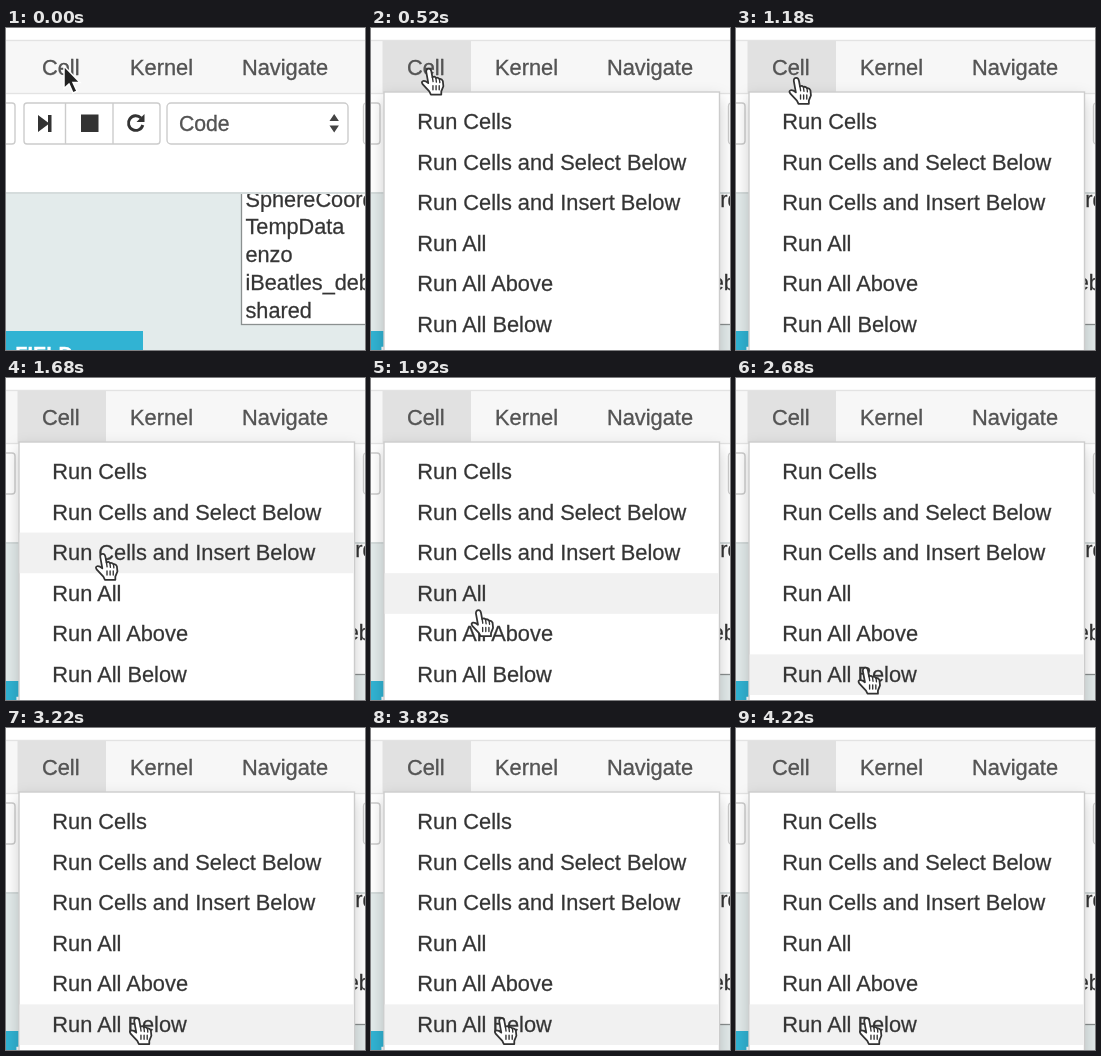
These frames come from a looping animation (359x322 px, 4.24 s). An HTML page:

```html
<!DOCTYPE html>
<html lang="en">
<head>
<meta charset="utf-8">
<title>Cell menu</title>
<style>
  html, body { margin: 0; width: 100%; height: 100%; overflow: hidden; background: #fff; }
  svg { display: block; width: 359px; height: 322px; font: 21.8px "Liberation Sans", Arial, sans-serif; fill: #333; }
  text, .icon, #arrow, #hand { filter: blur(.5px); }
  text { stroke: currentColor; stroke-width: .3; color: #444; }
  .panel { fill: #fff; stroke: #ccc; stroke-width: 1.4; }
  .nav { fill: #555; }
  .list { font-size: 21.7px; }
  #menu .panel { filter: drop-shadow(0 7px 8px rgba(0, 0, 0, .2)); }
</style>
</head>
<body>
<svg viewBox="0 0 359 322">
  <rect width="359" height="322" fill="#e3ebeb"/>

  <!-- page behind the header -->
  <rect x="235.5" y="100" width="140" height="196.5" fill="#fff" stroke="#8b9090" stroke-width="1.3"/>
  <g class="list" id="files"></g>
  <rect x="-5" y="303" width="142" height="30" fill="#31b3d3"/>
  <text x="67" y="333" text-anchor="end" font-size="20" font-weight="bold" style="fill:#fff;color:#fff">FIELD</text>

  <!-- header -->
  <rect y="163" width="359" height="3" fill="#d5dcdc"/>
  <rect width="359" height="164" fill="#fff"/>
  <rect x="-2" y="12.5" width="363" height="53" fill="#f7f7f7" stroke="#e3e3e3" stroke-width="1.4"/>
  <rect id="tab" x="11.5" y="13" width="88.500" height="52" fill="#e1e1e1"/>
  <g class="nav">
    <text x="36" y="47">Cell</text>
    <text x="124" y="47">Kernel</text>
    <text x="236" y="47">Navigate</text>
  </g>

  <!-- toolbar -->
  <g class="panel">
    <rect x="-20" y="75" width="29" height="41" rx="3"/>
    <rect x="18" y="75" width="136" height="41" rx="3"/>
    <path d="M59.5 75v41M107 75v41"/>
    <rect x="161" y="75" width="181" height="41" rx="4"/>
    <rect x="357.5" y="75" width="40" height="41" rx="3"/>
  </g>
  <g class="icon">
    <path d="M32 87l10 7.5v-7.5h3.500v17h-3.500v-7.500l-10 7.500z"/>
    <rect x="75" y="86.5" width="17.5" height="17.5"/>
    <path d="M135 90a7.300 7.300 0 1 0 1.800 7" fill="none" stroke="#333" stroke-width="2.9"/>
    <path d="M138.500 86v8h-8z"/>
    <path d="M323.500 93l4.700-7 4.700 7zM323.500 97.500h9.400l-4.700 7z" fill="#444"/>
  </g>
  <text x="173" y="103" font-size="21.2" style="fill:#555">Code</text>

  <g id="menu">
    <rect class="panel" x="13" y="64" width="335.5" height="290"/>
    <rect id="hover" x="13.7" width="334" height="40.6" fill="#f1f1f1"/>
    <g id="items"></g>
  </g>

  <path id="arrow" d="M58 38v22.500l5-4.500 4 9 4-1.800-4-8.700h7z" fill="#222" stroke="#fff" stroke-width="1.5"/>
  <g id="hand" stroke="#333" stroke-width="1.7" stroke-linejoin="round" stroke-linecap="round">
    <path fill="#fff" d="M7 15L5 4Q5 1 7.5 1Q9.5 1 10 4L11 9.5Q13 8 14.3 10Q16 9 17.7 11Q20 10.5 21 13L21.5 18L19.5 23V26H9.5L8 23L1.5 16Q0 13.5 2 13Q4 12.5 7 15Z"/>
    <path fill="none" d="M11 9.5l.6 4M14.3 10l.5 4M17.7 11l.4 3.5M11.5 17.5v4M14.5 17.5v4M17.5 17.5v4" stroke-width="1.3"/>
  </g>
</svg>
<script>
const LOOP = 4240, OPEN = 200, ROW = 40.6, TOP = 73.4;
const $ = id => document.getElementById(id);

// time, x, y of the hand's upper left corner
const path = [
  [0, 50, 39.5], [600, 50, 39.5], [1050, 51, 43], [1180, 52.5, 48.5], [1400, 68, 98],
  [1680, 89, 174.5], [1950, 101, 238], [2180, 109, 280.5], [2450, 119, 288], [2800, 123, 289], [LOOP, 123, 289]
];

function addLines(id, lines, x, y, step) {
  $(id).innerHTML = lines.map((s, i) => `<text x="${x}" y="${y + i * step}">${s}</text>`).join("");
}
addLines("files", ["SphereCoord", "TempData", "enzo", "iBeatles_deb", "shared"], 239.5, 178.5, 27.8);
addLines("items", ["Run Cells", "Run Cells and Select Below", "Run Cells and Insert Below",
  "Run All", "Run All Above", "Run All Below"], 46.3, 101, ROW);

function handAt(t) {
  const i = path.findIndex(p => p[0] > t);
  const [t0, x0, y0] = path[i - 1], [t1, x1, y1] = path[i];
  const k = (t - t0) / (t1 - t0);
  return [x0 + (x1 - x0) * k, y0 + (y1 - y0) * k];
}

const show = (id, on) => $(id).style.display = on ? "" : "none";

function draw(now) {
  const t = now % LOOP, open = t >= OPEN;
  const [x, y] = handAt(t);
  const row = Math.floor((y + 2 - TOP) / ROW);
  for (const id of ["tab", "menu", "hand"]) show(id, open);
  show("arrow", !open);
  show("hover", row >= 0);
  $("hover").setAttribute("y", TOP + row * ROW);
  $("hand").setAttribute("transform", `translate(${x} ${y}) scale(1.04)`);
  requestAnimationFrame(draw);
}
draw(performance.now());
</script>
</body>
</html>
```
